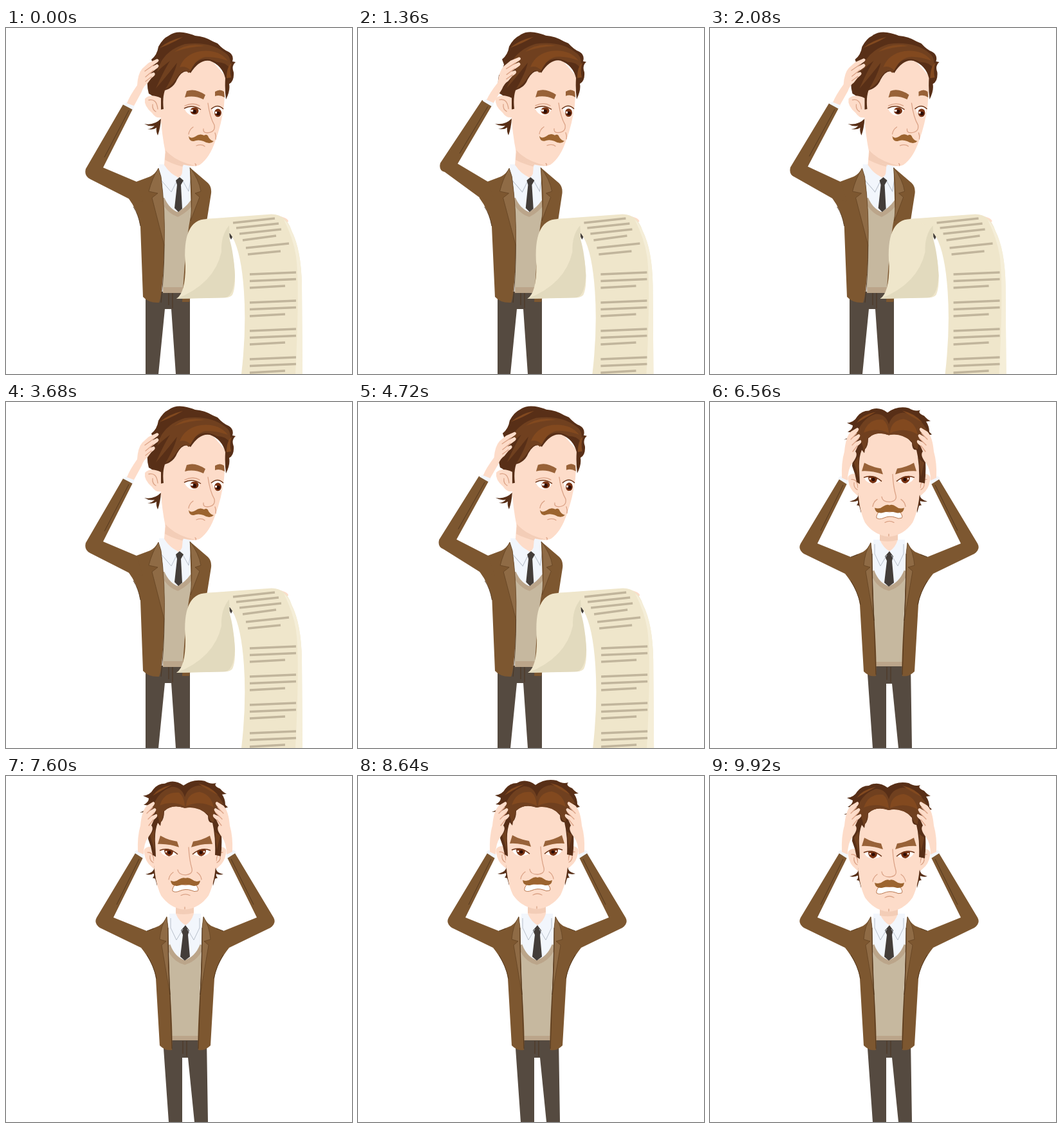
Recreate the animation shown at these times as an HTML page. Size 538x538 px, loop 10000 ms.

```html
<!DOCTYPE html>
<html lang="en">
<head>
<meta charset="utf-8">
<title>Worried man with a long list</title>
<style>
  html, body { margin: 0; width: 100%; height: 100%; overflow: hidden; background: #fff; }
  svg { display: block; width: 100vw; height: 100vh; }
  .jacket { fill: #7d5730; }
  .lapel { fill: #8f6b45; stroke: #5f3f20; stroke-width: .7; }
  .vest { fill: #c6b89f; }
  .trim { fill: none; stroke: #bba58a; stroke-width: 7; }
  .hem { fill: #bba58a; }
  .shirt { fill: #f2f6fc; }
  .tie { fill: #433d39; }
  .trousers { fill: #554a40; }
  .skin { fill: #fddcc9; }
  .shade { fill: #f3cdb7; }
  .hair { fill: #582f17; }
  .mid { fill: #70401f; }
  .light { fill: #82491f; }
  .brow { fill: #986238; }
  .stache { fill: #9c642f; }
  .white { fill: #fff; }
  .iris { fill: #7a3312; }
  .pupil { fill: #2d0d05; }
  .paper { fill: #efe6cb; }
  .fold { fill: #e2dabe; }
  .edge { fill: #f5eed8; }
  .line { fill: none; stroke: #dba387; stroke-width: 1.3; stroke-linecap: round; }
  .lid { fill: none; stroke: #6e3518; stroke-width: 1.5; }
  .seam { fill: none; stroke: #49301a; stroke-width: .8; }
  .crease { fill: none; stroke: #b8c0cb; stroke-width: 1; }
  .print { fill: none; stroke: #c1b59c; stroke-width: 3.4; }
</style>
</head>
<body>
<svg viewBox="0 0 538 538">
  <defs>
    <g id="side">
      <path class="jacket" d="M250 218Q246 228 238 233L219 241 167 220 213 127 201 120 141 220Q136 229 146 236L210 267Q230 292 233 315L239 419Q248 428 258 426Q260 410 255 330L252 236Z"/>
      <path class="lapel" d="M250 219Q241 232 239 254L249 257 242 263 255 340Q252 290 252 236Z"/>
      <path class="seam" d="M219 241L230 237M207 129L172 200M234 315Q230 296 219 278M252 236Q252 300 255 340L258 424"/>
      <path class="crease" d="M256 221L256 236 265 255 275 238"/>
    </g>
    <g id="hand">
      <path class="shirt" d="M199 119L203 115 215 121 213 128Z"/>
      <path class="skin" d="M205 118Q204 94 209 77Q211 54 219 46L229 40Q234 41 228 48L222 55 231 50Q236 51 231 57L225 63 234 59Q238 62 230 68L226 77Q231 82 222 94Q214 104 214 122Z"/>
      <path class="line" d="M219 58L228 49M221 67L231 57M222 77L229 68"/>
    </g>
    <g id="half">
      <path class="skin" d="M235 114C220 107 212 114 215 122Q217 135 226 142Q230 147 236 146Z"/>
      <path class="line" d="M220 120Q229 119 230 133M224 125Q223 133 229 136"/>
      <path class="hair" d="M231 144Q238 155 235 172L232 161Q230 160 228 160Q232 155 229 152Z"/>
    </g>
    <g id="eye">
      <path class="brow" d="M240 94Q252 101 266 103L269 112Q252 106 236 107Z"/>
      <path class="white" d="M240 118Q254 112 266 122Q263 126 252 126Q243 125 240 118Z"/>
      <path class="iris" d="M246 116Q254 113 260 118Q260 125 253 126Q246 124 246 116Z"/>
      <circle class="pupil" cx="254" cy="120" r="2.6"/>
      <circle class="white" cx="249" cy="119" r="1.3"/>
      <path class="lid" d="M239 117Q253 111 267 123"/>
      <path class="line" d="M260 151Q254 155 253 162"/>
    </g>
  </defs>

  <g id="reading">
    <path class="trousers" d="M217 410H286V538H264L257 437H247L237 538H217Z"/>
    <path class="seam" d="M253 412V431M259 412V436"/>
    <g id="body">
      <path class="shirt" d="M238 212H287L290 270 268 288 244 270Z"/>
      <path class="skin" d="M248 185L276 200V214Q276 229 268 233Q257 229 246 213Z"/>
      <path class="shade" d="M248 194L276 210V216Q258 211 247 205Z"/>
      <path class="shirt" d="M243 212Q252 224 267 232L258 254 239 229ZM275 213L287 229 284 253 273 234Z"/>
      <path class="crease" d="M239 234L257 255 267 235M274 236L284 254 288 231"/>
      <path class="vest" d="M243 263Q252 285 268 291Q283 286 290 266L285 412H244Z"/>
      <path class="trim" d="M243 265Q251 284 267 290Q281 283 290 270"/>
      <path class="hem" d="M245 403H276V412H244Z"/>
      <path class="tie" d="M264 237L270 232 276 237 272 244 274 281 268 286 262 280 266 244Z"/>
      <path class="jacket" d="M237 218Q232 227 224 231L200 240 190 264Q205 284 209 308L213 418Q222 428 238 427Q243 418 246 350Q248 285 241 231Z"/>
      <path class="jacket" d="M286 217L314 241Q320 247 319 257L308 326 285 426H274Q280 320 288 290Z"/>
      <path class="lapel" d="M237 218Q227 234 222 254L236 257 227 264 246 338Q248 285 241 231Z"/>
      <path class="lapel" d="M286 217Q300 235 303 254L294 257 301 263 287 300Q291 260 286 217Z"/>
      <path class="seam" d="M209 308Q206 290 198 278M241 427Q246 380 246 338"/>
    </g>
    <path class="jacket" id="arm"/>
    <path class="seam" id="armSeam"/>
    <g id="paper">
      <path class="tie" d="M344 318L354 321 350 329Z"/>
      <path class="skin" d="M422 292Q439 295 439 301L432 305Z"/>
      <path class="paper" d="M310 297L413 289.500Q436 290 444 315Q459 345 460 400L461 538H366Q374 470 370 410Q366 350 352 325L335 300Z"/>
      <path class="edge" d="M432 298Q440 304 445 318Q459 345 460 400L461 538H450Q457 400 451 355Q447 328 432 298Z"/>
      <path class="paper" d="M265 421Q279 412 279 370Q273 298 312 297L346 299Q344 330 354 362Q359 400 352 415Q348 420 338 419Z"/>
      <path class="fold" d="M347 307Q334 322 335 348Q324 398 265 421L338 419.500Q354 420 356 385Q354 350 348 330Z"/>
      <path class="paper" d="M312 297L350 295 362 340Q352 316 346 306L335 306Z"/>
      <path class="print" id="print"/>
    </g>
    <g id="head">
      <path class="hair" d="M241 141Q230 152 215 149Q223 154 231 152Q227 157 220 157Q229 159 234 155Q233 161 236 167Q240 156 241 141Z"/>
      <path class="skin" d="M240 82L240 130Q242 165 248 194Q254 208 278 213Q292 217 301 213Q317 202 326 174Q335 150 339 120L342 76 315 45H270Z"/>
      <path class="shade" d="M248 190Q264 208 294 214Q270 214 249 203Z"/>
      <path class="hair" d="M240 127Q235 108 222 102Q218 88 221 74Q226 68 229 57L226 49Q235 42 237 29Q244 16 253 12Q262 5 276 7Q287 9 294 12Q309 13 322 21L329 24Q338 34 346 37Q355 42 352 52L357 53Q350 59 354 69Q355 83 347 87Q349 97 342 111Q340 96 341 78Q336 58 317 51Q301 48 287 70Q276 62 266 80Q261 93 247 97Q243 109 245 126Z"/>
      <path class="mid" d="M235 68Q243 36 278 25Q317 20 340 38Q352 45 348 63Q342 53 328 53Q307 42 294 55L284 70Q276 60 264 80Q257 90 248 95Q263 69 266 54Q246 79 233 94Q246 65 255 51Q243 60 235 68Z"/>
      <path class="light" d="M270 61Q278 40 303 36Q331 33 345 51Q326 44 310 45Q295 48 287 66Q279 58 270 61ZM262 37Q282 22 309 28Q284 29 262 37ZM239 31Q253 19 275 14Q258 24 239 31Z"/>
      <path class="light" d="M343 78Q343 60 351 54Q347 65 350 77Z"/>
      <path class="skin" d="M241 109Q224 101 216 110Q214 121 227 132Q233 141 241 139Z"/>
      <path class="line" d="M222 112Q234 109 236 126M228 119Q227 127 233 130"/>
      <path class="brow" d="M281 98Q294 93 310 104L307 111Q292 104 278 108ZM325 99Q333 94 339 99L340 108Q332 103 325 106Z"/>
      <path class="white" d="M277 125Q290 119 302 127Q300 136 289 136Q281 134 277 125ZM320 125Q329 118 337 126Q337 138 330 140Q323 136 320 125Z"/>
      <ellipse class="iris" cx="293" cy="129" rx="6.500" ry="5.500"/>
      <ellipse class="iris" cx="329.500" cy="132" rx="5.500" ry="6.500"/>
      <circle class="pupil" cx="293" cy="130" r="3"/>
      <circle class="pupil" cx="330" cy="133" r="3"/>
      <path class="white" d="M287 127h4v3h-4ZM325 130h3v3h-3Z"/>
      <path class="lid" d="M277 125Q290 118 303 127M319 126Q329 117 338 126"/>
      <path class="line" d="M278 121Q291 115 301 121M314 117Q317 139 324 151Q326 162 313 163Q306 163 307 157M296 183Q304 180 309 184M291 154Q285 158 284 165M325 163Q327 168 326 173M294 211Q296 212 295 214"/>
      <path class="stache" d="M284 168Q287 173 294 169Q301 163 308 167Q313 164 315 170Q318 175 323 176Q317 182 307 176Q299 173 292 176Q285 177 284 168Z"/>
    </g>
    <g id="scratch">
      <path class="shirt" d="M182 119L189 115 200 121 197 127Z"/>
      <path class="skin" d="M188 117Q192 106 204 89Q205 71 212 63L222 54 235 48Q241 50 233 55L225 61 235 56Q241 59 233 64L224 71 230 69Q235 72 226 78L220 86Q214 90 211 99L199 121Z"/>
      <path class="line" d="M216 67L230 57M217 76L229 66M217 83L226 76"/>
    </g>
  </g>

  <g id="panic">
    <path class="trousers" d="M244 409H312L314 538H293L283 438H274V538H253Z"/>
    <path class="seam" d="M275 412V432M281 412V436"/>
    <path class="shirt" d="M254 214H303L305 268 279 292 253 268Z"/>
    <path class="skin" d="M264 192H292V214Q288 227 279 232Q269 226 264 214Z"/>
    <path class="vest" d="M253 262Q260 285 278 292Q296 285 304 262L299 411H257Z"/>
    <path class="trim" d="M252 263Q260 285 278 290Q297 284 305 263"/>
    <path class="hem" d="M257 404H300L299 411H258Z"/>
    <path class="tie" d="M272 240L279 232 285 240 283 247 286 281 278 287 271 281 275 247Z"/>
    <use href="#side"/><use href="#side" transform="matrix(-1 0 0 1 557 0)"/>
    <g id="angryHead">
      <path class="shade" d="M264 198H292V214Q279 218 264 215Z"/>
      <use href="#half"/><use href="#half" transform="matrix(-1 0 0 1 557 0)"/>
      <path class="hair" d="M230 140Q233 151 217 154Q225 156 231 152ZM326 140Q324 151 338 154Q330 156 325 152Z"/>
      <path class="skin" d="M230 68V125Q230 164 241 187Q255 207 278 209Q301 207 315 187Q326 164 327 125V68Q304 33 278 40Q249 35 230 68Z"/>
      <path class="hair" d="M208 58Q218 55 221 47L214 46Q222 42 222 36L213 32Q224 31 229 22Q236 13 247 13Q261 5 276 16Q291 5 309 9Q319 15 327 12Q322 17 333 21Q338 27 343 29L336 30Q341 37 341 46L345 50Q338 50 334 60Q337 78 335 92Q336 109 334 126L325 124Q326 103 323 84L321 74Q314 75 314 63Q300 46 278 51Q258 44 246 56Q246 68 241 73L240 79 236 74Q231 86 232 105L233 127 228 124Q226 111 221 99Q222 80 226 67Q221 56 208 58Z"/>
      <path class="mid" d="M227 53Q235 25 258 18Q273 18 278 34Q283 18 300 16Q326 19 338 45Q325 42 323 73Q317 73 314 61Q296 47 278 51Q259 44 245 56Q245 68 239 75Q235 55 227 53Z"/>
      <path class="light" d="M239 47Q246 25 269 27Q277 33 278 48Q259 39 239 47ZM280 48Q281 28 301 26Q319 30 323 50Q303 38 280 48ZM228 32Q237 19 258 15Q243 23 228 32ZM299 13Q318 17 330 31Q316 24 299 13Z"/>
      <path class="mid" d="M224 94L231 84 231 117ZM325 88L333 94 328 116Z"/>
      <use href="#eye"/><use href="#eye" transform="matrix(-1 0 0 1 557 0)"/>
      <path class="line" d="M284 112Q285 132 289 145Q291 154 279 155Q268 155 267 147M272 187Q279 183 286 187M278 205V208"/>
      <path class="white" stroke="#b9774f" d="M264 169Q279 172 294 169Q301 177 298 180Q293 182 288 179Q279 176 270 180Q263 183 259 180Q258 175 264 169Z"/>
      <path class="stache" d="M256 164Q263 167 269 162Q275 158 279 160Q284 158 289 162Q295 167 302 164Q301 173 291 172Q279 168 267 172Q257 173 256 164Z"/>
    </g>
    <use href="#hand"/><use href="#hand" transform="matrix(-1 0 0 1 557 0)"/>
  </g>
</svg>
<script>
  const LOOP = 10000, REPLAY = 3600, PANIC = 6560;
  const el = id => document.getElementById(id);
  const set = (id, name, value) => el(id).setAttribute(name, value);

  // Printed rows: a slanted heading block, then regular three-row paragraphs.
  const rows = [[353, 303, 418, 296], [358, 311, 424, 304], [363, 320, 428, 313],
                [368, 330, 420, 323], [373, 342, 440, 335], [376, 352, 427, 347]];
  for (let y = 383; y < 538; y += 44)
    [451, 451, 434].forEach((right, i) => rows.push([379, y + i * 10.500, right, y - 3 + i * 10.500]));
  set('print', 'd', rows.map(([a, b, c, d]) => `M${a} ${b}L${c} ${d}`).join(''));

  function drawArm(p) {
    const at = (x, y, dx, dy) => `${x + dx * p} ${y + dy * p} `;
    const inner = at(151, 217, 4, -6), cuff = at(197, 126, 11, -5);
    set('arm', 'd', 'M' + at(203, 239, -1, 0) + 'L' + inner + cuff + at(182, 119, 11, -7) +
      at(124, 219, 4, -9) + 'Q' + at(121, 230, 4, -8) + at(131, 235, 4, -11) +
      'L' + at(192, 266, -1, -1) + '213 270Z');
    set('armSeam', 'd', 'M' + at(191, 128, 11, -6) + 'L' + at(153, 201, 5, -6));
  }

  function drawReading(t) {
    const p = Math.sin(Math.PI * Math.min(t / 3040, 1)) ** 8 / .9;
    drawArm(p);
    // The torso leans from the waist, so its hem stays put.
    set('body', 'transform', `matrix(1 0 ${.009 * p} 1 ${-3.8 * p} 0)`);
    set('head', 'transform', `translate(${-2 * p} ${-.3 * p})`);
    set('paper', 'transform', `translate(${-1.600 * p} 0)`);
    set('scratch', 'transform', `translate(${12 * p} ${-5 * p}) rotate(${3 * p} 192 118)`);
  }

  function frame(now) {
    const t = now % LOOP, panic = t >= PANIC;
    set('reading', 'display', panic ? 'none' : 'inline');
    set('panic', 'display', panic ? 'inline' : 'none');
    if (panic) {
      const dy = 3 * Math.cos(2 * Math.PI * (t - 9920) / 1839) - 1;
      set('angryHead', 'transform', `translate(0 ${dy})`);
    } else {
      drawReading(t < REPLAY ? t : t - REPLAY);
    }
  }

  const start = performance.now();
  function tick() {
    frame(performance.now() - start);
    requestAnimationFrame(tick);
  }
  tick();
</script>
</body>
</html>
```
